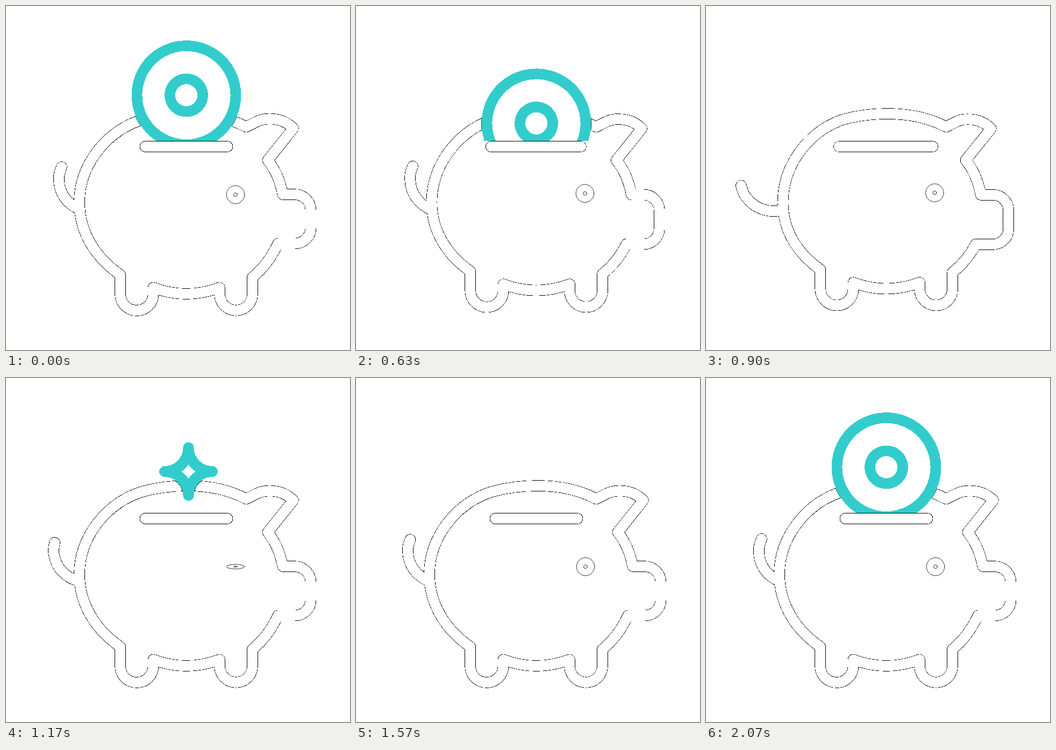
Animation of 640 by 640 pixels, one loop 2500 ms. Source, as an HTML page:

```html
<!DOCTYPE html>
<html lang="en">
<meta charset="utf-8">
<title>Piggy bank</title>
<style>
  html, body { margin: 0; height: 100%; overflow: hidden; background: #fff }
  svg { display: block; width: 100vw; height: 100vh }
</style>
<svg viewBox="0 0 640 640" shape-rendering="crispEdges" fill="none" stroke-linecap="round" stroke-linejoin="round">
  <defs>
    <g id="pig"><path id="body"/><path id="tail"/></g>
    <path id="slot"/>
    <path id="spark" d="M0-44.5C0-20 20 0 44.5 0C20 0 0 20 0 44.5C0 20-20 0-44.5 0C-20 0 0-20 0-44.5Z"/>
    <clipPath id="above"><path d="M0 0H640V251H0Z"/></clipPath>
    <mask id="onPig" maskUnits="userSpaceOnUse" x="0" y="0" width="640" height="640">
      <use href="#pig" stroke="#fff" stroke-width="20"/>
    </mask>
  </defs>

  <use href="#pig" stroke="#000" stroke-width="20.6"/>
  <use href="#pig" stroke="#fff" stroke-width="19.2"/>

  <g clip-path="url(#above)"><circle class="disc" cx="335.5" r="102" fill="#fff"/></g>
  <g mask="url(#onPig)" stroke="#000">
    <circle class="disc" cx="335.5" r="102.3" stroke-width=".8"/>
    <use class="star" href="#spark" stroke-width="21.5"/>
  </g>
  <g clip-path="url(#above)" stroke="#3cc" stroke-width="19.8">
    <g id="coin">
      <circle class="arc" r="92" pathLength="1" transform="rotate(-36) scale(1 -1)"/>
      <circle class="arc" r="30.5" pathLength="1" transform="rotate(-126) scale(1 -1)"/>
    </g>
  </g>
  <use class="star" href="#spark" stroke="#3cc" stroke-width="20" fill="#fff"/>

  <use href="#slot" stroke="#000" stroke-width="20.7"/>
  <use href="#slot" stroke="#fff" stroke-width="19.2"/>
  <g id="eye" stroke="#000" stroke-width=".8" fill="#fff">
    <ellipse rx="16.8"/><ellipse rx="3.4"/>
  </g>
</svg>
<script>
const LOOP = 2500;
const $ = id => document.getElementById(id);
const each = (sel, fn) => document.querySelectorAll(sel).forEach(fn);
const lerp = (a, b, k) => a + (b - a) * k;
const ease = k => (1 - Math.cos(Math.PI * Math.min(1, Math.max(0, k)))) / 2;
const ramp = (t, from, to) => ease((t - from) / (to - from));
const bump = (t, from, peak, to) => t < peak ? ramp(t, from, peak) : 1 - ramp(t, peak, to);

// "a>b" is a at rest and b when fully squashed
const morph = (d, k) => d.replace(/([\d.]+)>([\d.]+)/g, (_, a, b) => lerp(+a, +b, k));

const BODY = `M338,200.5 C300,200.5 272,206 250>252,212.5
  C184>190,235>238 136.5>149,298>300 136.5>149,365
  C136.5>149,420>418 166>176,468>454 212.5>213,500>482
  V535.8>518 A30,30 0 0 0 274,535.8>518 V524>506
  Q335,547>529 397.5,524>506
  V535.8>518 A30,30 0 0 0 458.5>459,535.8>518 V505>487
  Q488>484,481>468 506>498,442>444.8 H537>531
  A30>28,29>28 0 0 0 567>559,413>416.8 V380
  A30>28,29.5>28 0 0 0 537>531,350.5>352 H515>508
  C510>503,325 501>494,304 487>479.5,287
  L534.5>526.5,227.5>229 C523>515,216>217 510>502,210>211.5 491>485,210>211.5
  C475>472,210>211 470>468,213 447,225 C415,208 378,200.5 338,200.5Z`;
const SLOT = 'M259>237,261.5 H412>430.5';

// Tail points relative to its root
const TAIL = [[-32.5, -78.5], [-38, -66], [-38, -60], [-37.5, -53], [-37, -32], [-24, -11], [-2, -1]];

function tailPath(squash, degrees) {
  const a = -degrees * Math.PI / 180, size = 1 + squash * .1;
  const c = Math.cos(a) * size, s = Math.sin(a) * size;
  const p = TAIL.map(([x, y]) =>
    [136 + 12 * squash + x * c - y * s, 378 + 3 * squash + x * s + y * c].join());
  return `M${p[0]}C${p.slice(1).join(' ')}`;
}

function draw(t) {
  const squash = bump(t, 530, 780, 1030);
  const wag = 37 * (t < 1080 ? bump(t, 605, 910, 1080) : bump(t, 1080, 1345, 1610));
  $('body').setAttribute('d', morph(BODY, squash));
  $('slot').setAttribute('d', morph(SLOT, squash));
  $('tail').setAttribute('d', tailPath(squash, wag));

  // The coin drops into the slot, then is drawn anew
  const redraw = t >= 1600;
  const fall = redraw ? 0 : Math.min(200, 151.5 * (Math.max(0, t - 500) / 270) ** 1.47);
  const drawn = redraw ? ramp(t, 1600, 2060) : 1;
  const discY = redraw ? lerp(87, 166, drawn) : 166 + fall;
  const hidden = fall >= 200;
  $('coin').setAttribute('transform', `translate(335.5 ${166 + fall})`);
  each('.arc', el => {
    el.setAttribute('stroke-dasharray', drawn < 1 ? `${drawn} 2` : 'none');
    el.style.display = drawn > 0 ? '' : 'none';
  });
  each('.disc', el => {
    el.setAttribute('cy', discY);
    el.style.display = hidden ? 'none' : '';
  });

  const shine = t < 1250 ? ramp(t, 1030, 1170) : 1 - ramp(t, 1300, 1530);
  each('.star', el => {
    el.setAttribute('transform', `translate(339.5 174) scale(${shine})`);
    el.style.display = shine > 0 ? '' : 'none';
  });

  const open = 1 - .85 * bump(t, 1070, 1200, 1330);
  $('eye').setAttribute('transform', `translate(${427 - 3 * squash} ${351 - 6.5 * squash})`);
  each('#eye ellipse', el => el.setAttribute('ry', el.getAttribute('rx') * open));
}

const start = performance.now();
(function frame() {
  draw((performance.now() - start) % LOOP);
  requestAnimationFrame(frame);
})();
</script>
</html>
```
